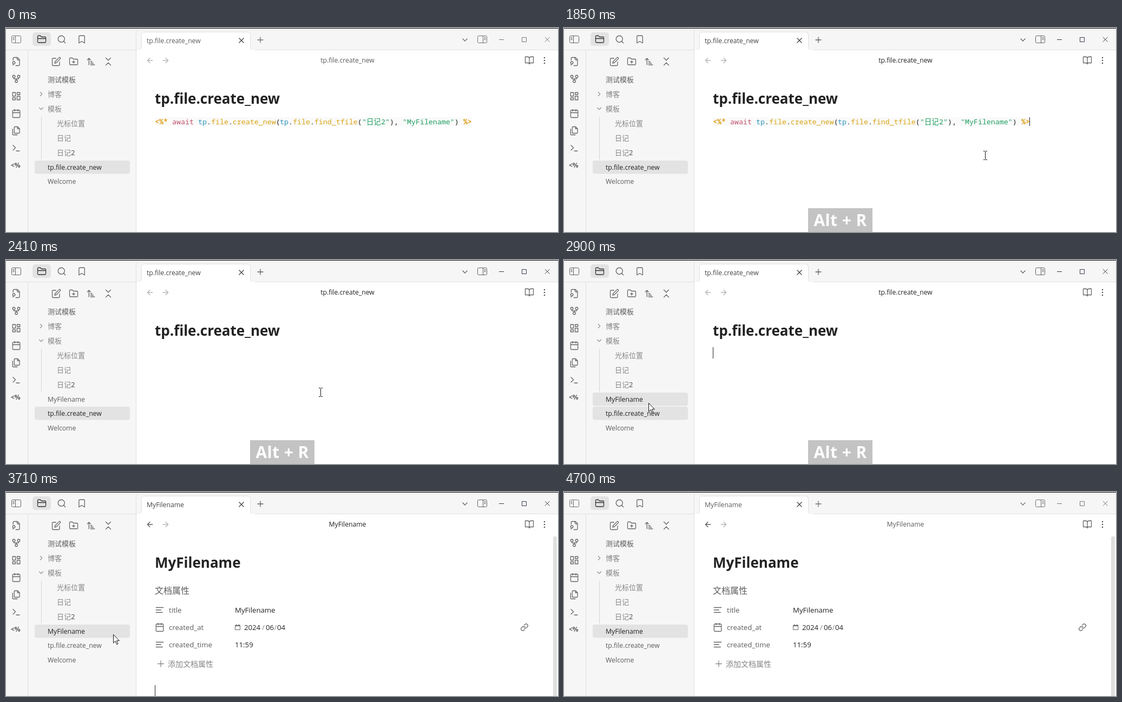
An HTML page that plays this animation: 1020x377 px, repeating every 4830 ms.

```html
<!DOCTYPE html>
<html lang="zh-CN">
<head>
<meta charset="utf-8">
<style>
html, body { margin: 0; width: 100%; height: 100%; overflow: hidden; background: #fff; }
svg { display: block; }
text { font: 12.2px "Open Sans", "Noto Sans CJK SC", sans-serif; fill: #5c5c5c; white-space: pre; }
.cjk { font-size: 13px; }
.dim { fill: #858585; }
.mid { text-anchor: middle; }
.h1 { font-size: 26px; font-weight: 700; fill: #222; }
.prop { font-size: 13.2px; }
.val { font-size: 13.2px; fill: #222; }
.code { font: 13.3px "Noto Sans Mono", "Noto Sans CJK SC", monospace; fill: #222; }
.tag { fill: #dfa21c; font-weight: 700; }
.kw { fill: #c0506b; }
.obj { fill: #2b95bb; }
.fn { fill: #d9a514; }
.str { fill: #1f9f5f; }
.tip text { fill: #fff; text-anchor: middle; }
.tip tspan { font-size: 12px; font-weight: 600; }
.keys { font-size: 30px; font-weight: 700; fill: #fff; letter-spacing: .4px; }
.line { fill: none; stroke: #666; }
.icon { fill: none; stroke: #666; stroke-linecap: round; stroke-linejoin: round; }
.edge { fill: none; stroke: #e0e0e0; }
.caret { fill: #222; }
</style>
</head>
<body>
<svg width="1020" height="377" viewBox="0 0 1020 377">
  <!-- window frame -->
  <path fill="#f6f6f6" d="M0 0h1020v40H241v337H0z"/>
  <path class="edge" d="M0 40.5H1020M40.5 41V377M240.5 1V377"/>
  <path fill="#fff" stroke="#e0e0e0" d="M244 40.5q6.500 0 6.500-6V13q0-5.500 5.500-5.500H446q5.500 0 5.500 5.500V34.500q0 6 6.500 6"/>
  <path fill="#fff" d="M242 40h218v2H242z"/>
  <path fill="#111" d="M0 0h1020v1H0z"/>
  <rect x="49" y="8" width="34" height="25" rx="5" fill="#e3e3e3"/>
  <g id="bar" class="line">
    <rect x="10.500" y="14.500" width="17" height="13" rx="2"/>
    <path d="M17.500 14.500v13M12.500 17.500h3M12.500 19.500h3M12.500 21.500h3"/>
    <rect x="871.500" y="14.500" width="17" height="13" rx="2"/>
    <path d="M881.500 14.500v13M883.500 17.500h3M883.500 19.500h3M883.500 21.500h3"/>
    <path d="M464.500 22h11M470 16.500v11M843.500 19.500l4.500 4.500 4.500-4.500" stroke-width="1.300"/>
    <path id="controls" d="M911 21.500h9M953.500 17.500h8v8h-8zM996 17l8.500 8.500M1004.500 17l-8.500 8.500"/>
  </g>
  <path class="line" d="M430.500 18.500l9 9M439.500 18.500l-9 9" style="stroke:#444" stroke-width="1.300"/>

  <!-- sidebar -->
  <text x="9" y="258" style="font-size:12px;font-weight:700">&lt;%</text>
  <path class="edge" d="M65.500 164v79" style="stroke:#d6d6d6"/>
  <text class="cjk" x="77" y="100">测试模板</text>
  <text class="cjk dim" x="77" y="127">博客</text>
  <text class="cjk dim" x="77" y="154">模板</text>
  <text class="cjk dim" x="94" y="181">光标位置</text>
  <text class="cjk dim" x="94" y="208">日记</text>
  <text class="cjk dim" x="94" y="235">日记<tspan fill="#444">2</tspan></text>
  <g id="rows"></g>

  <!-- pane header -->
  <text id="tab" x="260" y="28"></text>
  <text id="head" class="mid" x="631" y="64"></text>
  <g fill="#555"><circle cx="995" cy="55" r="1.300"/><circle cx="995" cy="60" r="1.300"/><circle cx="995" cy="65" r="1.300"/></g>
  <text id="title" class="h1" x="275" y="140"></text>

  <g id="code">
    <path fill="#fafafa" d="M275 165h586v16H275z"/>
    <text class="code" y="178"><tspan class="tag" x="275">&lt;%*</tspan><tspan class="kw" x="307">await</tspan><tspan class="obj" x="355">tp</tspan>.<tspan class="fn">file</tspan>.<tspan class="fn">create_new</tspan>(<tspan class="obj" x="506">tp</tspan>.<tspan class="fn">file</tspan>.<tspan class="fn">find_tfile</tspan>(<tspan class="str" x="658">"日记</tspan><tspan class="str" x="693">2"</tspan>), <tspan class="str" x="733">"MyFilename"</tspan>) <tspan class="tag" x="845">%&gt;</tspan></text>
  </g>

  <g id="props">
    <text x="275" y="188" style="font-size:16px">文档属性</text>
    <text class="prop" x="301" y="223">title</text>
    <text class="prop" x="301" y="255">created_at</text>
    <text class="prop" x="301" y="287">created_time</text>
    <text class="val" x="423" y="223">MyFilename</text>
    <text class="val" y="255"><tspan x="440">2024</tspan><tspan class="dim" x="473">/</tspan><tspan x="480">06</tspan><tspan class="dim" x="495.500">/</tspan><tspan x="501">04</tspan></text>
    <text class="val" x="423" y="287">11:59</text>
    <text class="dim" x="299" y="323" style="font-size:14px">添加文档属性</text>
    <path class="line" d="M280 317.500h12M286 311.500v12M423.500 246.500h9v8h-9zM423 247.500h10M425.500 244v2M430.500 244v2"/>
    <rect x="1011" y="82" width="7" height="310" rx="3" fill="#e0e0e0"/>
  </g>
  <g id="icons"></g>

  <rect id="codeCaret" class="caret" x="860" y="165" width="1" height="16"/>
  <rect id="emptyCaret" class="caret" x="275" y="161" width="1" height="21"/>
  <rect id="noteCaret" class="caret" x="275" y="357" width="1" height="20"/>

  <g id="tip" class="tip">
    <path fill="#1a1a1a" style="filter:drop-shadow(0 2px 4px #0004)" d="M266 237h170q4 0 4 4v32q0 4-4 4H266q-4 0-4-4v-10l-5-5 5-5v-12q0-4 4-4z"/>
    <text class="cjk" x="351" y="253">最后修改于 <tspan>2024-06-04 11:59</tspan></text>
    <text class="cjk" x="351" y="270">创建于 <tspan>2024-06-04 11:59</tspan></text>
  </g>
  <g id="keys">
    <path fill="#c3c3c3" d="M451 333h119v44H451z"/>
    <text class="keys mid" x="510.500" y="366">Alt + R</text>
  </g>
  <circle id="click" cx="156" cy="265" r="12" fill="#f4ec5c" opacity=".85"/>
  <g id="mouse">
    <path id="beam" fill="none" stroke="#111" d="M-3 -7.500h2.500l1 1 1-1H4M-3 8.500h2.500l1-1 1 1H4M.5 -6.500v14"/>
    <path id="arrow" fill="#fff" stroke="#111" stroke-linejoin="round" d="M.5 .5v15.500l3.600-3.400 2.600 6 2.300-1-2.600-5.800h5z"/>
  </g>
</svg>
<script>
const $ = id => document.getElementById(id);
const show = (id, on) => $(id).style.display = on ? '' : 'none';

const ring = (x, y, r) => `M${x - r} ${y}a${r} ${r} 0 1 0 ${2 * r} 0a${r} ${r} 0 1 0 ${-2 * r} 0`;
const folder = 'M20 20a2 2 0 0 0 2-2V8a2 2 0 0 0-2-2h-7.930a2 2 0 0 1-1.660-.9l-.82-1.200A2 2 0 0 0 7.930 3H4a2 2 0 0 0-2 2v13c0 1.100.9 2 2 2Z';
const calendar = 'M5 4h14a2 2 0 0 1 2 2v14a2 2 0 0 1-2 2H5a2 2 0 0 1-2-2V6a2 2 0 0 1 2-2zM16 2v4M8 2v4M3 10h18';
const lines = 'M3 6h18M3 12h12M3 18h16';

// Adds an icon drawn on a 24-unit grid, centred at x, y
function icon(x, y, d, { size = 18, color = '#666', id = '', into = 'icons' } = {}) {
  const k = size / 24;
  $(into).insertAdjacentHTML('beforeend',
    `<path id="${id}" class="icon" style="stroke:${color}" stroke-width="${1.3 / k}"
      transform="translate(${x - size / 2} ${y - size / 2}) scale(${k})" d="${d}"/>`);
}

icon(66, 21, folder + 'M2 10h20', { color: '#333' });
icon(103, 21, ring(11, 11, 8) + 'M21 21l-4.300-4.300');
icon(140, 21, 'm19 21-7-4-7 4V5a2 2 0 0 1 2-2h10a2 2 0 0 1 2 2z');
icon(19, 62, ring(6, 15, 3) + 'M4 21l1-3M14 2v4a2 2 0 0 0 2 2h4M4.300 9V4a2 2 0 0 1 2-2H15l5 5v13a2 2 0 0 1-2 2h-7');
icon(19, 94, ring(12, 18, 3) + ring(6, 6, 3) + ring(18, 6, 3) + 'M18 9v2q0 1-1 1H7q-1 0-1-1V9M12 12v3');
icon(19, 126, 'M3 3h7v9H3zM14 3h7v5h-7zM14 12h7v9h-7zM3 16h7v5H3z');
icon(19, 158, calendar);
icon(19, 190, 'M15.500 2H8.600Q7 2 7 3.600v12.800Q7 18 8.600 18h9.800q1.600 0 1.600-1.600V6.500zM3 7.600v12.800Q3 22 4.600 22h9.800M15 2v5h5');
icon(19, 222, 'm4 17 6-6-6-6M12 19h8');
icon(93, 62, 'M11 4H4a2 2 0 0 0-2 2v14a2 2 0 0 0 2 2h14a2 2 0 0 0 2-2v-7M18.500 2.500a2.100 2.100 0 0 1 3 3L12 15l-4 1 1-4z');
icon(125, 62, folder + 'M12 10v6M9 13h6');
icon(157, 62, 'm3 8 4-4 4 4M7 4v16M11 12h4M11 16h7M11 20h10');
icon(189, 62, 'm6 21 6-6 6 6M6 3l6 6 6-6');
icon(65, 122, 'm9 18 6-6-6-6', { size: 14, color: '#999' });
icon(65, 149, 'm6 9 6 6 6-6', { size: 14, color: '#999' });
icon(266, 60, 'm12 19-7-7 7-7M19 12H5', { size: 16, id: 'back' });
icon(295, 60, 'm12 5 7 7-7 7M5 12h14', { size: 16, color: '#b5b5b5' });
icon(967, 60, 'M2 3h6a4 4 0 0 1 4 4v14a3 3 0 0 0-3-3H2zM22 3h-6a4 4 0 0 0-4 4v14a3 3 0 0 1 3-3h7z');
icon(284, 218, lines, { into: 'props' });
icon(284, 250, calendar, { into: 'props' });
icon(284, 282, lines, { into: 'props' });
icon(958, 250, 'M10 13a5 5 0 0 0 7.540.54l3-3a5 5 0 0 0-7.070-7.070l-1.720 1.710M14 11a5 5 0 0 0-7.540-.54l-3 3a5 5 0 0 0 7.070 7.070l1.710-1.710', { size: 15, into: 'props' });

const LOOP = 4830, STEP = 70;
const CREATED = 1980, CLEARED = 2070, HOVER = 2690, PRESS = 3240, OPENED = 3520, BLUR = 4700;

// Pointer moves: start, end, from, to
const moves = [
  [0, 490, [960, 345], [778, 235]],
  [2200, 2760, [778, 235], [156, 264]],
  [3500, 3710, [156, 264], [198, 263]],
  [3710, 4200, [198, 263], [940, 390]],
];

function pointer(t) {
  const [start, end, from, to] = moves.findLast(m => t >= m[0]);
  const p = Math.min(1, Math.floor((t - start) / STEP) * STEP / (end - start));
  const e = p * p * (3 - 2 * p);
  return from.map((v, i) => Math.round(v + (to[i] - v) * e));
}

function drawRows(t) {
  const names = ['tp.file.create_new', 'Welcome'];
  if (t >= CREATED) names.unshift('MyFilename');
  const open = t < OPENED ? 'tp.file.create_new' : 'MyFilename';
  $('rows').innerHTML = names.map((name, i) => {
    const y = Math.round(257 + 26.5 * i - .1);
    const lit = name == open || (name == 'MyFilename' && t >= HOVER);
    return (lit ? `<rect x="53" y="${y - 12}" width="176" height="24.500" rx="4" fill="#e3e3e3"/>` : '') +
      `<text x="77" y="${y + 4.5}" style="fill:${lit ? '#222' : '#5c5c5c'}">${name}</text>`;
  }).join('');
}

function draw(t) {
  const focused = t >= 390 && t < BLUR;
  const opened = t >= OPENED;
  const active = focused && !(t >= PRESS && !opened);
  const name = opened ? 'MyFilename' : 'tp.file.create_new';
  for (const id of ['tab', 'head', 'title']) $(id).textContent = name;
  $('tab').style.fill = focused ? '#444' : '#5c5c5c';
  $('head').style.fill = active ? '#222' : '#5c5c5c';
  $('bar').style.stroke = focused ? '#606060' : '#707070';
  $('controls').style.stroke = focused ? '#333a4a' : '#777';
  $('back').style.stroke = opened ? '#5c5c5c' : '#b5b5b5';
  drawRows(t);

  show('code', t < CLEARED);
  show('props', opened);
  show('codeCaret', (t >= 390 && t < 920) || (t >= 1450 && t < 1980));
  show('emptyCaret', t >= 2510 && t < 3040);
  show('noteCaret', opened && (t < 3910 || t >= 4440) && t < BLUR);
  show('keys', t >= 1850 && t < 3170);
  show('tip', t >= 3100 && !opened);
  show('click', t >= PRESS && t < 3450);

  const [x, y] = pointer(t);
  $('mouse').setAttribute('transform', `translate(${x} ${y})`);
  show('mouse', t >= STEP && t < 4180);
  show('beam', x > 240);
  show('arrow', x <= 240);
}

function tick() {
  draw(performance.now() % LOOP);
  requestAnimationFrame(tick);
}
tick();
</script>
</body>
</html>
```
